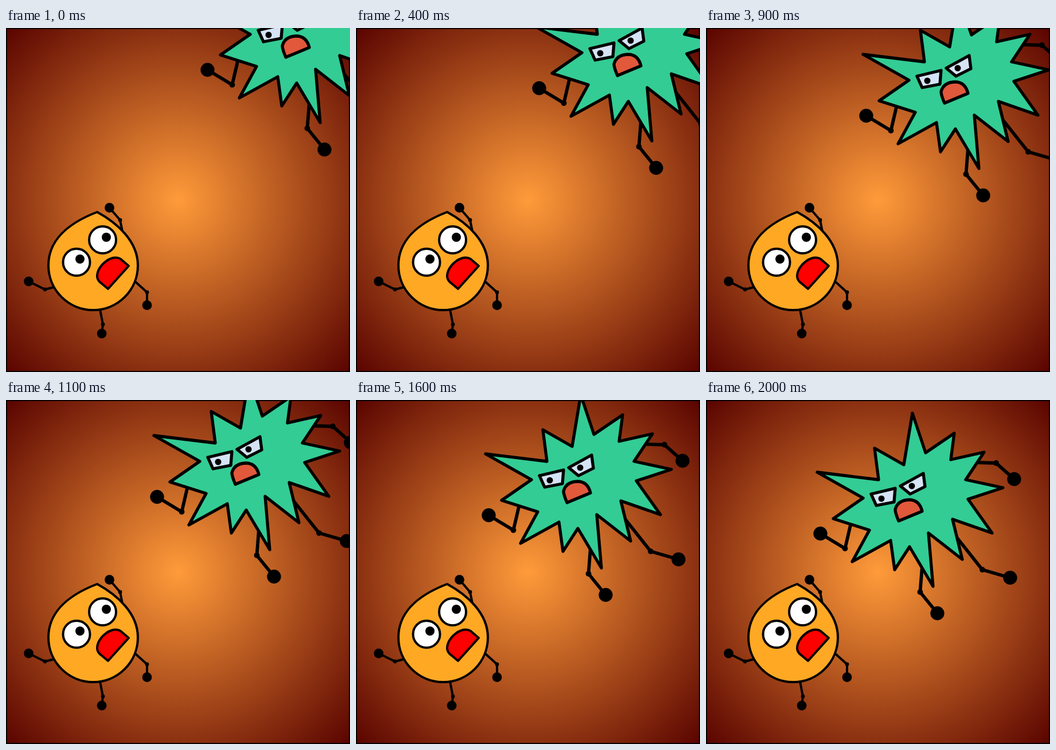
Animation of 600x600 px, one loop 7000 ms. Source, as an HTML page:

```html
<!DOCTYPE html>
<html lang="en">
<head>
<meta charset="utf-8">
<title>Spiky chase</title>
<style>
html, body { margin: 0; height: 100%; overflow: hidden; background: #5a0400; }
svg { display: block; width: 100%; height: 100%; }
.ink { stroke: #000; stroke-linejoin: round; stroke-linecap: round; }
.limbs { fill: none; }
.limbs path { marker-mid: url(#joint); marker-end: url(#ball); }
.pupils { stroke: none; }
#drop { stroke-width: 4; }
#star { stroke-width: 5.3; filter: blur(.5px); }
#star .limbs { stroke-width: 5.8; }
</style>
</head>
<body>
<svg viewBox="0 0 600 600">
  <defs>
    <radialGradient id="glow" gradientUnits="userSpaceOnUse" cx="300" cy="300" r="422">
      <stop offset="0" stop-color="#ff9b3a"/>
      <stop offset="1" stop-color="#5a0400"/>
    </radialGradient>
    <!-- Joints and hands scale with the line width of their limb -->
    <marker id="joint" overflow="visible"><circle r=".85"/></marker>
    <marker id="ball" overflow="visible"><circle r="2.1"/></marker>
  </defs>
  <rect width="600" height="600" fill="url(#glow)"/>
  <rect x=".5" y=".5" width="599" height="599" fill="none" stroke="#000" stroke-width="2.5"/>

  <g id="drop" class="ink">
    <g class="limbs">
      <path d="M203 355L199 335L180.5 313.5"/>
      <path d="M84 452L68 456L39.5 442"/>
      <path d="M225 442L246 461V483.5"/>
      <path d="M164 491L169 517L167 533"/>
    </g>
    <path fill="#ffa824" d="M159 321C125 334 74 361 74 414A78 78 0 0 0 230 414C230 372 194 340 159 321Z"/>
    <g fill="#fff">
      <circle cx="168.5" cy="369.5" r="23.5"/>
      <circle cx="123" cy="408.5" r="23.5"/>
    </g>
    <g class="pupils">
      <circle cx="175" cy="365" r="8"/>
      <circle cx="129" cy="403" r="8"/>
    </g>
    <path fill="red" d="M178 455L214 415L200 403C186 393 158 414 159 434Q160 441 166 445Z"/>
  </g>

  <g id="star" class="ink">
    <g class="limbs">
      <path d="M253 214L242.5 259L199.5 233"/>
      <path d="M377 290L373.5 335L403.5 372"/>
      <path d="M436 238L482 296L530.5 310"/>
      <path d="M472 109L506 110L537.5 138"/>
    </g>
    <path fill="#33cc94" d="M360 23L383 92L433 58L427 104L485 91L453 139L518 153L457 173L499 232L430 208L447 278L388 232L396 325L355 256L329 296L322 245L255 282L285 227L222 207L274 171L194 126L301 139L294 84L345 113Z"/>
    <g fill="#d5e3f5">
      <path d="M288 164L330 154L328 178L297 184Z"/>
      <path d="M339 150L379 128L382 151L356 164Z"/>
    </g>
    <g class="pupils">
      <circle cx="306" cy="172" r="5.5"/>
      <circle cx="359" cy="150" r="5.5"/>
    </g>
    <path fill="#e2583b" d="M336 211L377 194Q372 174 354 174Q334 175 330 191Q330 197 336 211Z"/>
  </g>
</svg>
<script>
const star = document.getElementById('star');
const LOOP = 7000, TICK = 100, STEP = 8, LAST = 20;

// One step per tick, with a pause at tick 15 and a double drop at tick 9
function draw(now) {
  const tick = Math.min(LAST, Math.floor(now % LOOP / TICK));
  const across = tick - (tick >= 15);
  const down = across + (tick >= 9);
  star.setAttribute('transform', `translate(${(LAST - 1 - across) * STEP} ${(down - LAST) * STEP})`);
}

const start = performance.now();
function loop() {
  draw(performance.now() - start);
  requestAnimationFrame(loop);
}
loop();
</script>
</body>
</html>
```
